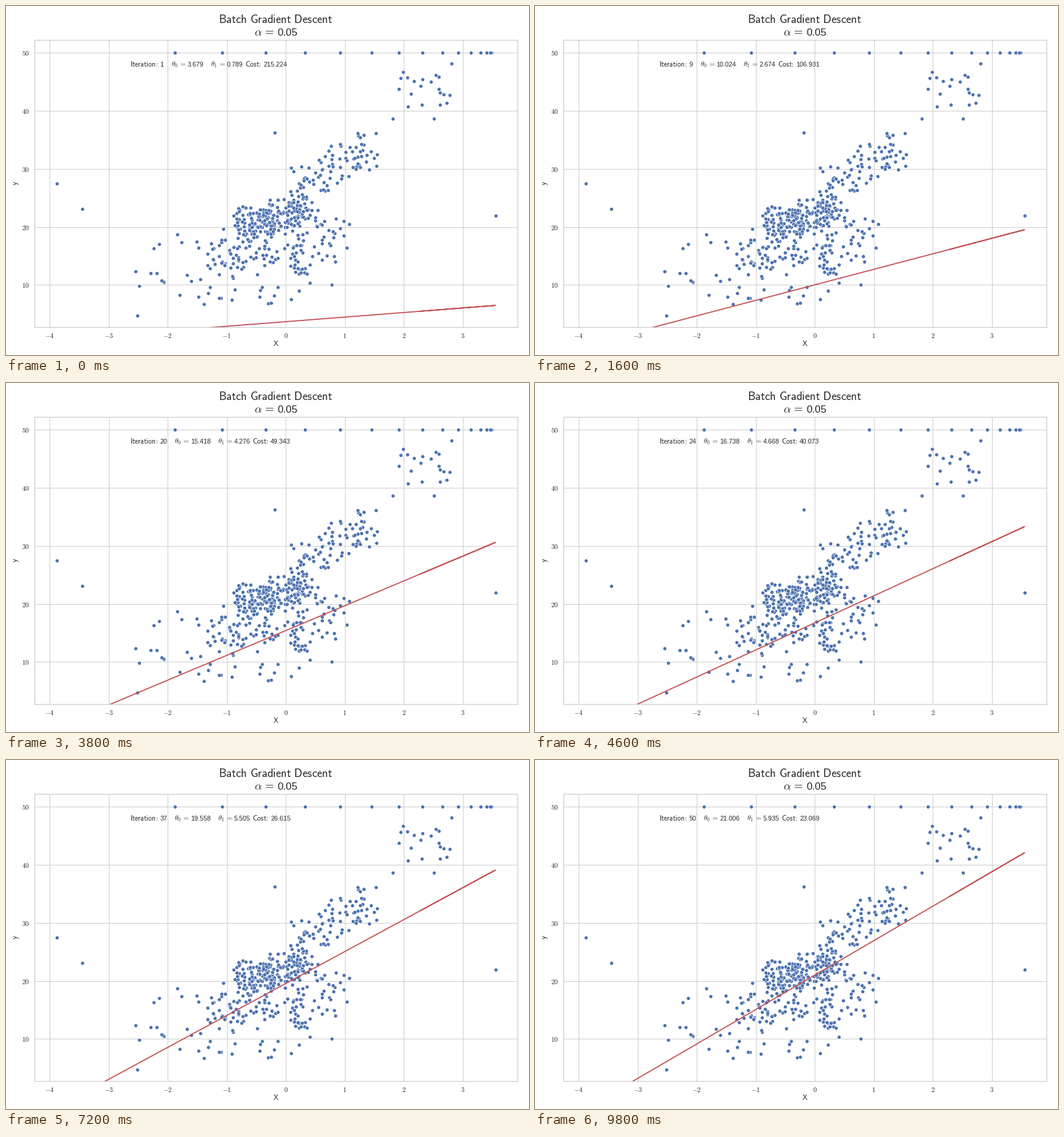
Recreate the animation shown at these times as a matplotlib script. Size 864 by 576 pixels, loop 10000 ms.

```python
import numpy as np
import matplotlib.pyplot as plt
from matplotlib.animation import FuncAnimation

W, H, DPI = 864, 576, 72
INK, GRID, BLUE, RED = "#262626", "#cccccc", "#4C72B0", "#C44E52"
X_MIN, X_MAX, TOP = -3.8764, 3.5515, 50

# Gradient descent on standardised data: every gap to the optimum
# shrinks by the learning rate in each iteration.
RATE, STEPS = 0.05, 50
BEST, GAP = np.array([22.53281, 6.3888]), np.array([18.8543, 5.5998])
COST_MIN, COST_GAP = 21.8003, 193.4237

SMALL, SMALL_DIGITS = 11.85, 10.7
LARGE, LARGE_DIGITS = 18.9, 17.1

plt.rcParams["mathtext.fontset"] = "cm"
plt.rcParams["font.family"] = "Liberation Sans"

EXTREMES = [(X_MIN, 27.5), (-3.45, 23.1), (X_MAX, 21.9), (-0.19, 36.2)]
# count, centre x, half width, centre y, slope, half height
CLOUDS = [
    (205, -0.20, 0.78, 21.7, 2.0, 3.4),
    (85, 0.83, 0.80, 30.6, 5.0, 4.5),
    (60, -0.65, 0.75, 15.8, 1.0, 4.5),
    (36, 0.20, 0.28, 15.3, 0.0, 4.5),
    (28, 0.75, 0.40, 19.0, 0.0, 6.5),
    (34, -1.60, 1.30, 13.0, 2.0, 7.5),
    (16, -0.30, 1.20, 8.0, 0.0, 3.0),
    (22, 2.30, 0.75, 43.0, 1.0, 6.5),
]


def spread(rng, n):
    return 2 * rng.beta(2, 2, n) - 1


def cloud(rng, n, cx, wx, cy, slope, wy):
    dx = wx * spread(rng, n)
    return np.column_stack([cx + dx, cy + slope * dx + wy * spread(rng, n)])


def make_points():
    rng = np.random.default_rng(11)
    u = np.linspace(0, 1, 15)
    capped = np.column_stack([3.48 - 5.36 * u ** 2.2, np.full(15, TOP)])
    parts = [cloud(rng, *c) for c in CLOUDS]
    return np.vstack([EXTREMES, capped] + parts)


def label(x, y, s, size, **kw):
    kw = {"va": "baseline", **kw}
    return fig.text(x / W, 1 - y / H, s, fontsize=size, color=INK, **kw)


def sans(s):
    return r"$\mathsf{%s}$" % s


def digits_width(s):
    return SMALL_DIGITS * (0.556 * len(s) - 0.278 * s.count("."))


fig = plt.figure(figsize=(W / DPI, H / DPI), dpi=DPI, facecolor="white")
ax = fig.add_axes([47.45 / W, 1 - 529.9 / H, 797.75 / W, 474.2 / H])
ax.set_xlim(X_MIN - 0.375, X_MAX + 0.375)
ax.set_ylim(2.75, 52.25)
ax.set_axisbelow(True)
ax.grid(True, color=GRID, lw=1)
for spine in ax.spines.values():
    spine.set(color=GRID, linewidth=1.25)
x_ticks, y_ticks = range(-4, 4), range(10, TOP + 1, 10)
ax.set_xticks(x_ticks, [f"${v}$" for v in x_ticks])
ax.set_yticks(y_ticks, [f"${v}$" for v in y_ticks])
ax.tick_params(length=0, labelsize=11, labelcolor=INK)
ax.tick_params(axis="x", pad=8.2)
ax.tick_params(axis="y", pad=9)

label(445.5, 28, sans(r"Batch\ Gradient\ Descent"), LARGE, ha="center")
label(410.3, 49.4, sans(r"\alpha\hspace{0.12}="), LARGE)
label(448, 49.4, f"{RATE}", LARGE_DIGITS)
label(445.5, 561, sans("X"), 12, ha="center")
label(18, 292.5, sans("y"), 12, ha="center", va="center", rotation=90)

points = make_points()
xs = points[:, 0]
ax.scatter(*points.T, s=36, color=BLUE, edgecolor="white", linewidth=0.6)
line, = ax.plot([], [], color=RED, lw=1.8)

# caption, room before it, distance from its start to its number, format
FIELDS = [
    (r"Iteration\!:", 0, 49.4, "%d"),
    (r"\theta_{\mathrm{0}}\,=", 12, 27, "%.3f"),
    (r"\theta_{\mathrm{1}}\,=", 11.4, 27, "%.3f"),
    (r"Cost\!:", 3.8, 29.8, "%.3f"),
]
captions = [label(0, 100, sans(f[0]), SMALL) for f in FIELDS]
numbers = [label(0, 100, "", SMALL_DIGITS) for f in FIELDS]


def draw(i):
    decay = (1 - RATE) ** i
    t0, t1 = BEST - GAP * decay
    cost = COST_MIN + COST_GAP * decay ** 2
    line.set_data(xs, t0 + t1 * xs)

    x = 205.2
    values = (i + 1, t0, t1, cost)
    for (_, room, reach, fmt), cap, num, v in zip(FIELDS, captions, numbers,
                                                  values):
        text = fmt % v
        cap.set_x((x + room) / W)
        x += room + reach
        num.set_x(x / W)
        num.set_text(text)
        x += digits_width(text)
    return [line, *captions, *numbers]


anim = FuncAnimation(fig, draw, frames=STEPS, interval=200,
                     init_func=lambda: draw(0), repeat=True, repeat_delay=0)
plt.show()
```
